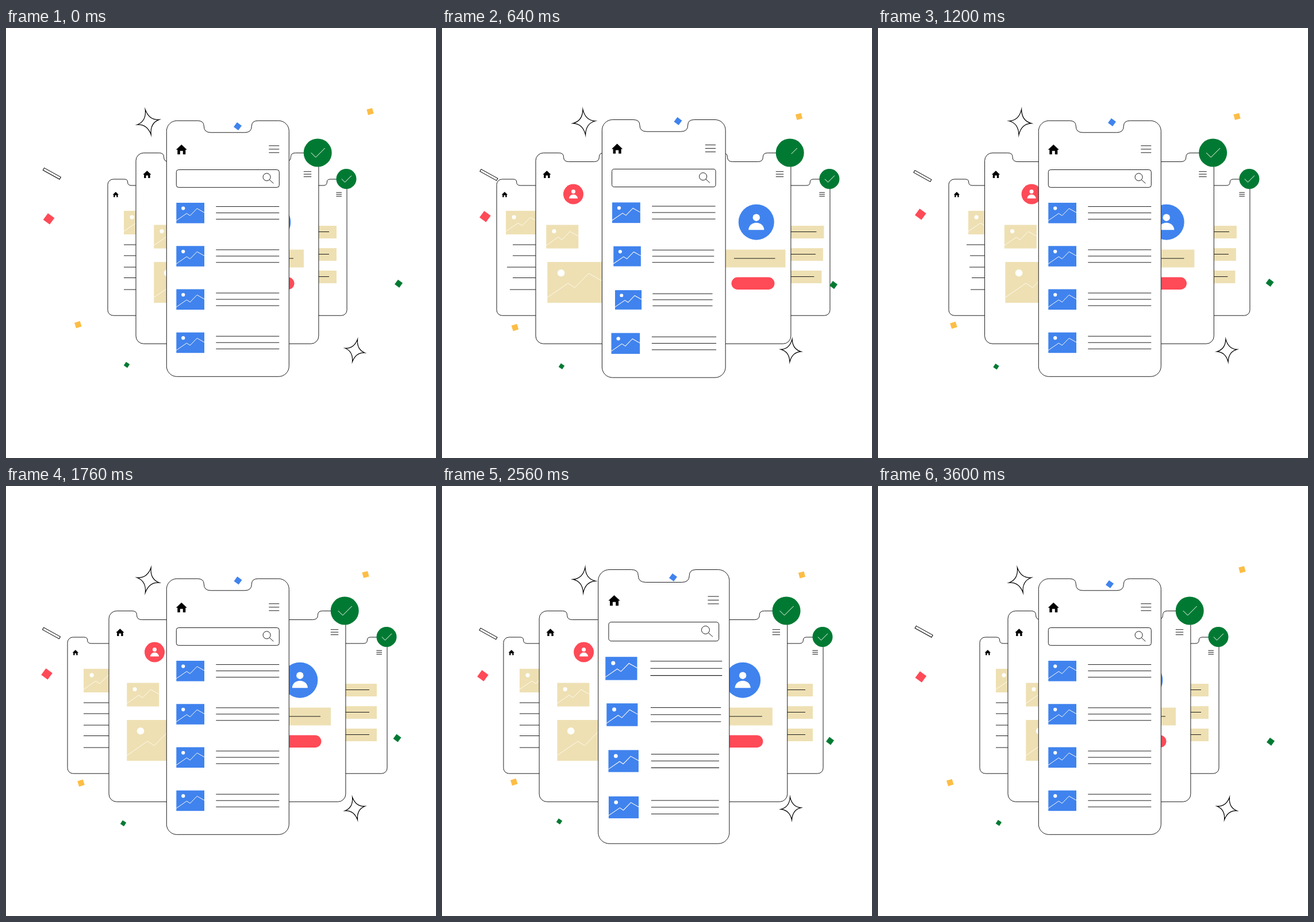
Animation, 748 px wide and 748 px high, one loop 3.68 s. Source, as an HTML page with a canvas:

```html
<!DOCTYPE html>
<html>
<head>
<meta charset="utf-8">
<style>
html, body { margin: 0; width: 100%; height: 100%; overflow: hidden; background: #fff; }
canvas { display: block; }
</style>
</head>
<body>
<canvas id="stage" width="748" height="748"></canvas>
<script>
const ctx = document.getElementById('stage').getContext('2d');
const LOOP = 3680, STEP = 80, CLOSE_AT = 2400;
const INK = '#1c1c1c', BLUE = '#4083ee', RED = '#ff4a57', TAN = '#eee0b3',
      GREEN = '#007a33', YELLOW = '#fdbd45', CREAM = '#fffaf0';

// Smooth curve through a flat list of time, value pairs, without overshoot.
function curve(t, keys) {
  const n = keys.length / 2, T = i => keys[2 * i], V = i => keys[2 * i + 1];
  if (t <= T(0)) return V(0);
  if (t >= T(n - 1)) return V(n - 1);
  const slope = i => (V(i + 1) - V(i)) / (T(i + 1) - T(i));
  const tangent = i => {
    if (i === 0 || i === n - 1) return 0;
    const a = slope(i - 1), b = slope(i);
    return a * b <= 0 ? 0 : 2 * a * b / (a + b);
  };
  let i = 0;
  while (T(i + 1) < t) i++;
  const h = T(i + 1) - T(i), u = (t - T(i)) / h, w = 1 - u;
  return V(i) * w * w * (1 + 2 * u) + V(i + 1) * u * u * (3 - 2 * u)
    + h * u * w * (tangent(i) * w - tangent(i + 1) * u);
}

// Both halves of the loop share the same pulses.
const PULSE = [0, 1, 160, 1.071, 260, 1.082, 400, 1.05, 560, .97, 640, 1.008, 720, 1.02, 900, 1];
const ROW_PULSE = [55, 1, 115, 1.038, 160, 1.059, 280, 1.07, 425, 1.06, 470, 1.042,
                   510, 1.006, 555, .938, 595, .97, 640, .995, 720, 1];
const MID_MOVE = [0, 0, 160, -.21, 240, -.4, 440, 1, 560, 1.47, 640, 1.34];
const BACK_MOVE = [160, 0, 300, -.41, 400, -.1, 560, 1, 640, 1.17, 740, 1.41];
const MID = { near: 159, far: 206, open: [...MID_MOVE, 1020, .77, 1200, .86, 1450, 1],
              close: [...MID_MOVE, 860, .85, 1060, 1] };
const BACK = { near: 208, far: 278, open: [...BACK_MOVE, 1140, .75, 1200, .77, 1500, 1],
               close: [...BACK_MOVE, 980, .85, 1180, 1] };

const spread = (t, { near, far, open, close }) => near + (far - near) *
  (t < CLOSE_AT ? curve(t, open) : 1 - curve(t - CLOSE_AT, close));

// Outward sway of a part against its phone.
const sway = (t, opened, settled, closed, lean = 0) =>
  curve(t, [0, 0, 640, opened, 1200, settled, 1700, 0, 2400, 0, 2560, lean, 2960, closed, 3440, 0]);

function at(x, y, scale, angle, draw) {
  ctx.save();
  ctx.translate(x, y);
  ctx.rotate(angle * Math.PI / 180);
  ctx.scale(scale, scale);
  ctx.lineWidth = 1 / scale;
  draw();
  ctx.restore();
}

function line(points, color = INK) {
  ctx.beginPath();
  points.forEach(p => ctx.lineTo(...p));
  ctx.strokeStyle = color;
  ctx.stroke();
}

const rule = (x1, x2, y) => line([[x1, y], [x2, y]]);

function rect(x, y, w, h, color) {
  ctx.fillStyle = color;
  ctx.fillRect(x, y, w, h);
}

function disc(x, y, r, color) {
  ctx.beginPath();
  ctx.arc(x, y, r, 0, 7);
  ctx.fillStyle = color;
  ctx.fill();
}

const SHELL = new Path2D('M18 0H54Q65 0 65 9.5Q65 20.5 77 20.5H136Q148 20.5 148 9.5Q148 0 159 0' +
  'H195A18 18 0 0 1 213 18V427A18 18 0 0 1 195 445H18A18 18 0 0 1 0 427V18A18 18 0 0 1 18 0Z');
const HOME = new Path2D('M26 41.5L35.5 50.5H33V58.5H28.5V52.5H23.5V58.5H19V50.5H16.5Z');

function phone(x, y, scale, { home = true, menu = true }, content = () => {}) {
  at(x, y, scale, 0, () => {
    ctx.fillStyle = '#fff';
    ctx.fill(SHELL);
    ctx.strokeStyle = INK;
    ctx.stroke(SHELL);
    ctx.fillStyle = '#000';
    if (home) ctx.fill(HOME);
    if (menu) [43.5, 49.5, 55.5].forEach(dy => rule(178, 196, dy));
    content();
  });
}

function picture(x, y, w, h, color) {
  rect(x, y, w, h, color);
  disc(x + w * .245, y + h * .27, h * .088, '#fff');
  line([[0, .87], [.37, .52], [.49, .63], [.74, .28], [1, .48]]
    .map(([u, v]) => [x + u * w, y + v * h]), CREAM);
}

function avatar(x, y, r, color) {
  at(x, y, r / 31, 0, () => {
    disc(0, 0, 31, color);
    disc(0, -8, 6.2, '#fff');
    ctx.beginPath();
    ctx.ellipse(0, 13.5, 13.5, 12.5, 0, Math.PI, 0);
    ctx.fill();
  });
}

// The tick is wiped from its start while the phones swing.
function badge(x, y, r, t, delay) {
  const u = (t < CLOSE_AT ? t : t - CLOSE_AT) - delay;
  const cut = curve(u, [400, 0, 600, .65, 800, 0]) * 3;
  const corner = [-3.5, 8], end = [12.5, -8];
  const start = cut < 1 ? [-11.5 + 8 * cut, 8 * cut]
                        : [-3.5 + 8 * (cut - 1), 8 - 8 * (cut - 1)];
  at(x, y, r / 24.5, 0, () => {
    disc(0, 0, 24.5, GREEN);
    line(cut < 1 ? [start, corner, end] : [start, end], '#fff');
  });
}

function backPhones(t) {
  const d = spread(t, BACK), left = 385 - d, right = 385 + d, scale = .533;
  phone(left, 263, scale, { menu: false });
  picture(left + 28 - sway(t, 12, -6, 5), 318, 57.5, 41, TAN);
  [[377, 0, -3, 15], [396, 0, -9, 15], [416, 10, -8, 11], [434.5, 0, -12, 15], [455, 5, -10, 14]]
    .forEach(([y, ...s]) => {
      const x = left + 28 - sway(t, ...s);
      rule(x, x + 57.5, y);
    });

  phone(right - 113.5, 263, scale, { home: false });
  [[344, 7.5, -5, -5.5], [383, 6, -6, .5], [422, 3.5, -7.5, 5]].forEach(([y, ...s]) => {
    const x = right - 18 + sway(t, ...s);
    rect(x - 77.5, y, 77.5, 22, TAN);
    rule(x - 65, x - 13, y + 10.5);
  });
  badge(right - 1, 262.5, 17.5, t, 220);
}

function midPhones(t) {
  const d = spread(t, MID), left = 385 - d, right = 385 + d, scale = .746;
  phone(left, 217.3, scale, { menu: false });
  avatar(left + 79.5 - sway(t, 14, -2, 0, 2), 289, 17.5, RED);
  picture(left + 31.3 - sway(t, 13, -3, 5.5), 342.5, 56, 41, TAN);
  picture(left + 31.3 - sway(t, 11, -4.5, 8.5), 407, 97, 71, TAN);

  phone(right - 159, 217.3, scale, { home: false });
  avatar(right - 79.7 + sway(t, 19.5, -3, 0, 2), 337.7, 31, BLUE);
  const banner = right - 26 + sway(t, 16.5, -8, -6);
  rect(banner - 107, 385.5, 107, 31, TAN);
  rule(banner - 89.5, banner - 18, 400.8);
  ctx.beginPath();
  ctx.roundRect(right - 117.5 + sway(t, 14, -5, 0), 433.5, 75, 21.5, 10.75);
  ctx.fillStyle = RED;
  ctx.fill();
  badge(right - 1.8, 217, 24.5, t, 0);
}

function frontPhone(t) {
  const u = t < CLOSE_AT ? t : t - CLOSE_AT, scale = curve(u, PULSE);
  phone(385.8 - 106.5 * scale, 383.8 - 222.5 * scale, scale, {}, () => {
    ctx.beginPath();
    ctx.roundRect(17, 85.2, 179, 30.8, 4);
    ctx.moveTo(180.8, 98);
    ctx.arc(174.3, 98, 6.5, 0, 7);
    ctx.moveTo(179, 102.6);
    ctx.lineTo(186, 109);
    ctx.stroke();
    for (let i = 0; i < 4; i++) {
      at(106.5, 160.5 + 75.2 * i, curve(u - 45 * i, ROW_PULSE), 0, () => {
        picture(-89.5, -17.8, 48.7, 35.6, BLUE);
        [-11.2, -.2, 10.8].forEach(y => rule(-20.5, 89.5, y));
      });
    }
  });
}

function sparkle(x, y, w, h, angle) {
  at(x, y, 1, angle, () => {
    ctx.beginPath();
    ctx.moveTo(0, -h);
    ctx.quadraticCurveTo(2.5, -2.5, w, 0);
    ctx.quadraticCurveTo(2.5, 2.5, 0, h);
    ctx.quadraticCurveTo(-2.5, 2.5, -w, 0);
    ctx.quadraticCurveTo(-2.5, -2.5, 0, -h);
    ctx.closePath();
    ctx.lineWidth = 1.2;
    ctx.strokeStyle = '#000';
    ctx.stroke();
  });
}

// Each piece drifts through these places at the DRIFT times and back to the first.
const DRIFT = [0, 640, 1200, 1760, 2560, 2960, 3640];
const CONFETTI = [
  { color: RED, size: 14, angle: 36, xs: [74.5, 75, 74, 71, 71, 73.5], ys: [332, 328, 324, 327, 330, 329.5] },
  { color: YELLOW, size: 10, angle: -15, xs: [633.5, 621, 624.5, 625.5, 626, 624], ys: [145.3, 154, 154, 154, 154.5, 152] },
  { color: BLUE, size: 10, angle: 36, xs: [403, 410.5, 407, 403.5, 402, 404.5], ys: [171, 162, 164, 164.5, 159, 158.5] },
  { color: GREEN, size: 10, angle: 36, xs: [683, 681, 681.5, 680.5, 675, 679.5], ys: [444.7, 447, 443, 438.5, 443.5, 443] },
  { color: YELLOW, size: 10, angle: -17, xs: [125.3, 127, 131.5, 130.5, 125.3, 130], ys: [516, 521, 517, 516.7, 515, 509.5] },
  { color: GREEN, size: 7.5, angle: 33, xs: [210, 208, 205.5, 204, 204, 203], ys: [586, 588.5, 589, 586.7, 583.5, 590.7] },
  { stick: true, angle: 29, xs: [79.8, 81.5, 77.5, 79, 80.5, 78], ys: [253.3, 255.5, 257.5, 256, 257, 257] }
];

function confetti(t) {
  const place = list => curve(t, DRIFT.flatMap((time, i) => [time, list[i % 6]]));
  CONFETTI.forEach(({ color, size, angle, stick, xs, ys }) =>
    at(place(xs), place(ys), 1, angle, () => {
      if (!stick) return rect(-size / 2, -size / 2, size, size, color);
      ctx.strokeStyle = '#000';
      ctx.strokeRect(-16.5, -2.2, 33, 4.4);
    }));
}

function draw() {
  const t = Math.floor(performance.now() % LOOP / STEP) * STEP;
  const tilt = 13 * Math.cos(2 * Math.PI * t / LOOP);
  rect(0, 0, 748, 748, '#fff');
  ctx.lineWidth = 1;
  backPhones(t);
  midPhones(t);
  frontPhone(t);
  sparkle(247.3, 163.8, 19.5, 22.3, -tilt);
  sparkle(607, 561, 17.5, 20, tilt);
  confetti(t);
  requestAnimationFrame(draw);
}
draw();
</script>
</body>
</html>
```
